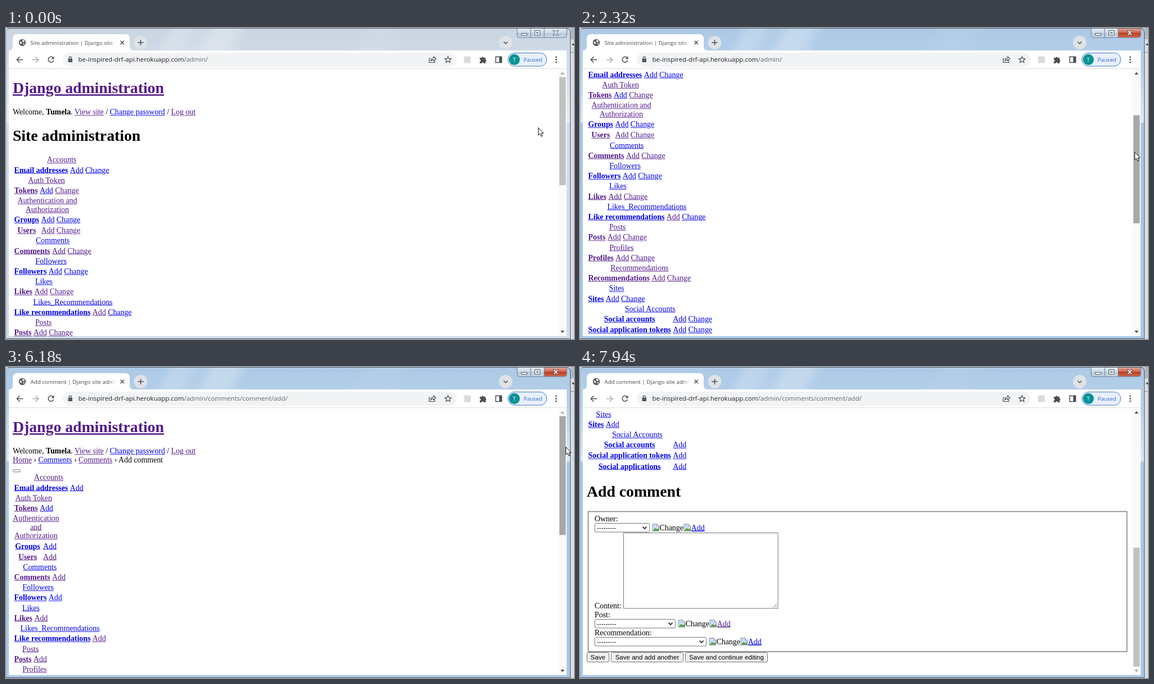
Recreate the animation shown at these times as an HTML page. Size 1010x554 px, loop 8000 ms.

```html
<!DOCTYPE html>
<html lang="en">
<head>
<meta charset="utf-8">
<title>Site administration</title>
<style>
html, body { margin: 0; width: 100%; height: 100%; overflow: hidden; }
#stage { position: relative; width: 1010px; height: 554px; overflow: hidden; background: #d9dde2; }
#stage > * { position: absolute; }
#frame {
  --streaks: linear-gradient(118deg, transparent 27%, #fff3 29% 31%, #fff1 33% 34%, #fff4 36% 39%, transparent 42% 60%, #fff1 63% 66%, transparent 70%) 0 0 / 100% 72px no-repeat;
  left: 0; top: 0; width: 1002px; height: 552px;
  border: 1px solid #4d5966; border-left-color: #a9bccf; border-radius: 7px 7px 0 0;
  background: var(--streaks), linear-gradient(#c9d5e2, #d3dde9 72px, #e6edf5 167px, #cfdcea 168px);
}
#frame.active {
  background: var(--streaks), linear-gradient(#acc9e6, #b7d1ea 72px, #dbe9f6 167px, #a7c7e7 168px);
}
#view { left: 5px; top: 73px; width: 992px; height: 476px; overflow: hidden; background: #fff; }
.page { position: absolute; left: 0; top: 0; }
.flow {
  position: absolute; display: flow-root; width: 1112px; padding: 0 8px;
  transform: scale(.867); transform-origin: 0 0;
  font: 16px/18px "Liberation Serif", "Times New Roman", serif; color: #000;
}
h1 { font-size: 32px; line-height: 37px; margin: 21.44px 0; }
a { color: #00e; text-decoration: underline; }
a.seen { color: #551a8b; }
a.hit { color: #f00; }
table { border-spacing: 2px; border-collapse: separate; }
th, td { padding: 1px; }
.toggle { height: 18px; position: relative; }
.toggle i {
  position: absolute; top: 10.5px; box-sizing: border-box; width: 16px; height: 6px;
  border: 1px solid #767676; border-radius: 2px; background: #efefef;
}
svg { left: 0; top: 0; overflow: visible; }
.form { position: absolute; left: -5px; top: 454px; }
.form text { font: 13.87px "Liberation Serif", "Times New Roman", serif; }
.form .ctl { font: 11.56px "Liberation Sans", Arial, sans-serif; }
.form .link { fill: #00e; text-decoration: underline; }
.form .link.seen { fill: #551a8b; }
#ui text { font-family: "Open Sans", "Noto Sans", sans-serif; }
.line { fill: none; stroke: #4b4f54; stroke-width: 1.5; }
</style>
</head>
<body>
<div id="stage">
  <div id="frame"></div>
  <div id="view">
    <div class="page" id="index"><div class="flow"></div></div>
    <div class="page" id="add">
      <div class="flow"></div>
      <svg class="form" width="1010" height="554"></svg>
    </div>
  </div>
  <svg id="ui" width="1010" height="554">
    <defs>
      <linearGradient id="fade"><stop offset="0" stop-color="#fff" stop-opacity="0"/><stop offset="1" stop-color="#fff"/></linearGradient>
      <linearGradient id="red" x2="0" y2="1"><stop offset="0" stop-color="#e2a598"/><stop offset=".45" stop-color="#cf6552"/><stop offset=".5" stop-color="#b93a22"/><stop offset="1" stop-color="#d3694c"/></linearGradient>
      <linearGradient id="glass" x2="0" y2="1"><stop offset="0" stop-color="#e3edf6"/><stop offset=".48" stop-color="#ccdbea"/><stop offset=".52" stop-color="#b5c9dd"/><stop offset="1" stop-color="#c9dbec"/></linearGradient>
    </defs>

    <!-- window behind -->
    <path d="M1004 0h6v20h-6z" fill="#aeb6c0"/>
    <path d="M1004 43.5h6" stroke="#8d949c"/>
    <path d="M1006 28h6l-3 3.5z" fill="#333"/>

    <!-- caption buttons -->
    <path d="M909 1h48v16h-44q-4 0-4-4z" fill="url(#glass)"/>
    <path id="close" d="M957 1h40v12q0 4-4 4h-36z"/>
    <path d="M909 1v12q0 4 4 4h80q4 0 4-4V1M933 1v16M957 1v16" fill="none" stroke="#6f7d8d"/>
    <g fill="#fff" stroke="#4c545e">
      <path d="M916.5 9.5h10v3.500h-10zM940.500 4.500h9v8.500h-9z"/>
      <path d="M943.500 7.500h3v2.500h-3z"/>
      <path d="M972.500 4.500h3l2 2.300 2-2.300h3l-3.500 4.200 3.500 4.300h-3l-2-2.400-2 2.400h-3l3.500-4.300z"/>
    </g>

    <!-- tab strip -->
    <path d="M5 40q7 0 7-7V19q0-8 8-8h192q8 0 8 8v14q0 7 7 7z" fill="#fff"/>
    <path d="M5 40h992v32H5z" fill="#fff"/>
    <path d="M5 72.500h992" stroke="#dcdfe3"/>
    <g id="globe">
      <circle cx="29" cy="26" r="6.200" fill="#54585d"/>
      <path d="M24.500 23.500l3 1 1 2.500-1.500 2-2-1.500zM29 21l3 .5 1.500 3-3 1-1.500-2zM30.500 27l3 .5-1.500 2.500-1.500-1z" fill="#fff" opacity=".85"/>
    </g>
    <path id="spin" d="M29 20.200a5.800 5.800 0 1 1-5.800 5.800" fill="none" stroke-width="1.700"/>
    <text id="title" x="43.500" y="29.700" font-size="9.750" fill="#45494d"></text>
    <path d="M182 16h14v20h-14z" fill="url(#fade)"/>
    <path d="M196 16h8v20h-8z" fill="#fff"/>
    <path class="line" d="M203.500 22.800l6.400 6.400m0-6.400l-6.400 6.400"/>
    <g fill="#dfe2e6"><circle cx="239.500" cy="26" r="12"/><circle cx="888.500" cy="26" r="12"/></g>
    <path class="line" d="M234.500 26h10m-5-5v10M885 24.500l3.500 3.500 3.500-3.500"/>

    <!-- toolbar -->
    <rect x="101" y="44" width="700" height="25" rx="12.500" fill="#f1f3f4"/>
    <path class="line" d="M30.500 56.500h-11m5-5.200l-5.200 5.200 5.200 5.200"/>
    <path class="line" d="M46.500 56.500h11m-5-5.200l5.200 5.200-5.200 5.200" style="stroke:#a9adb1"/>
    <g id="reload"><path class="line" d="M84.200 53.500a4.900 4.900 0 1 0 .5 4.200"/><path d="M85.500 50.500v5h-5z" fill="#4b4f54"/></g>
    <path id="stop" class="line" d="M75.500 52l9 9m0-9l-9 9"/>
    <path d="M110.500 54.500h7.500v6.500h-7.500z" fill="#55595e"/>
    <path class="line" d="M112.200 55v-1.800a2 2 0 0 1 4.100 0V55" style="stroke-width:1.200"/>
    <text x="128.500" y="60.300" font-size="11.520" fill="#202124">be-inspired-drf-api.herokuapp.com<tspan id="path" fill="#62666b"></tspan></text>
    <g class="line" style="stroke-width:1.200">
      <path d="M755 54.500h-2.500v7h10v-3M755.500 58.500c.3-3.500 2.500-5 5-5v-2.300l4 3.700-4 3.700v-2.300c-2 0-3.500.5-5 2.200z"/>
      <path d="M786 50.700l1.600 3.700 4 .4-3 2.700.9 3.900-3.500-2.100-3.500 2.100.9-3.900-3-2.700 4-.4z"/>
      <path d="M870.800 51.300h10.600v10.200h-10.600z" style="stroke-width:1.500"/>
    </g>
    <path d="M877 51h5v11h-5z" fill="#4b4f54"/>
    <rect x="814.500" y="50.500" width="12" height="12" fill="#d9dbde"/>
    <path d="M842.500 53h3.300a1.900 1.900 0 0 1 3.700 0h3.200v3.200a1.900 1.900 0 0 1 0 3.700V63h-3.200a1.700 1.700 0 0 0-3.600 0h-3.400v-3.300a1.700 1.700 0 0 0 0-3.500z" fill="#4b4f54"/>
    <rect x="892.500" y="44.500" width="69" height="23.500" rx="11.700" fill="#e8f0fe" stroke="#3b78c9"/>
    <circle cx="904" cy="56.300" r="9.700" fill="#0a9295"/>
    <text x="904" y="59.800" font-size="9.500" fill="#fff" text-anchor="middle">T</text>
    <text x="920.500" y="59.800" font-size="9.650" fill="#2a6bc8">Paused</text>
    <g fill="#4b4f54"><circle cx="978.300" cy="52" r="1.400"/><circle cx="978.300" cy="56.500" r="1.400"/><circle cx="978.300" cy="61" r="1.400"/></g>

    <!-- scrollbar -->
    <path d="M982 73h15v476h-15z" fill="#fafafa"/>
    <path id="up" d="M986 82.700l3.500-4 3.500 4z"/>
    <path id="down" d="M986 539.300l3.500 4 3.500-4z"/>
    <rect id="thumb" x="984" width="11.300"/>

    <g id="status">
      <path d="M5 530.500h325q5 0 5 5V549H5z" fill="#dee1e6"/>
      <text x="9.700" y="543.300" font-size="9.900" fill="#55595e">be-inspired-drf-api.herokuapp.com/admin/comments/comment/add/</text>
    </g>
    <path id="cursor" d="M.5.5V14l3-2.800 2.200 4.900 2.300-1-2.200-4.700h4.100z" fill="#fff" stroke="#111"/>
  </svg>
</div>
<script>
const $ = id => document.getElementById(id);
const link = (text, seen) => `<a class="${+seen ? 'seen' : ''}">${text}</a>`;

// caption, caption visited, then rows of [model, visited flags for model / add / change]
const APPS = [
  ['Accounts', 1, ['Email addresses', '000']],
  ['Auth Token', 1, ['Tokens', '101']],
  ['Authentication and Authorization', 1, ['Groups', '000'], ['Users', '111']],
  ['Comments', 0, ['Comments', '111']],
  ['Followers', 0, ['Followers', '000']],
  ['Likes', 0, ['Likes', '111']],
  ['Likes_Recommendations', 0, ['Like recommendations', '010']],
  ['Posts', 1, ['Posts', '111']],
  ['Profiles', 1, ['Profiles', '111']],
  ['Recommendations', 1, ['Recommendations', '111']],
  ['Sites', 0, ['Sites', '000']],
  ['Social Accounts', 0, ['Social accounts', '000'], ['Social application tokens', '000'], ['Social applications', '000']],
];

const tables = actions => APPS.map(([name, seen, ...rows]) =>
  `<table><caption>${link(name, seen)}</caption>` + rows.map(([model, flags]) =>
    `<tr><th>${link(model, flags[0])}</th>` +
    actions.map((label, i) => `<td>${link(label, flags[i + 1])}</td>`).join('') + '</tr>'
  ).join('') + '</table>').join('');

const header = `<h1>${link('Django administration', 1)}</h1><div>Welcome, <b>Tumela</b>. ` +
  `${link('View site', 1)} / ${link('Change password', 0)} / ${link('Log out', 1)}</div>`;

document.querySelector('#index .flow').innerHTML =
  header + '<h1>Site administration</h1>' + tables(['Add', 'Change']);
document.querySelector('#add .flow').innerHTML = header +
  `<div>${link('Home', 1)} › ${link('Comments', 0)} › ${link('Comments', 1)} › Add comment</div>` +
  '<div class="toggle"><i></i></div>' + tables(['Add']) + '<h1>Add comment</h1>';
const addLink = document.querySelectorAll('#index table')[3].querySelector('td a');

const label = (x, y, text, cls = '') => `<text x="${x}" y="${y}" class="${cls}">${text}</text>`;
const box = (x, y, w, h, fill, r = 2) =>
  `<rect x="${x}" y="${y}" width="${w}" height="${h}" rx="${r}" fill="${fill}" stroke="#767676"/>`;
const brokenImage = (x, y) => `<g transform="translate(${x} ${y})">
  <path d="M1 .5h8l3.500 3.500v9H1z" fill="#c9dcf5" stroke="#8d9196"/>
  <path d="M1.500 12.500l4-5 3 2 3.500-1v4z" fill="#58a345"/>
  <path d="M9 .5V4h3.500" fill="#fff" stroke="#8d9196"/></g>`;
const picker = (y, w, seen) => box(26.5, y, w, 15.5, '#fff') +
  label(30, y + 11.5, '---------', 'ctl') +
  `<path d="M${w + 14.5} ${y + 6}l3.500 3.500 3.500-3.500" fill="none" stroke="#111" stroke-width="1.600"/>` +
  brokenImage(w + 31, y + .8) + label(w + 44.5, y + 12, 'Change') +
  brokenImage(w + 87, y + .8) + label(w + 100.8, y + 12, 'Add', 'link ' + (seen ? 'seen' : ''));
const button = (x, w, text) => box(x, 508.5, w, 17, '#efefef') +
  `<text x="${x + w / 2}" y="521.200" text-anchor="middle" class="ctl">${text}</text>`;

document.querySelector('.form').innerHTML =
  '<rect x="14.500" y="257.500" width="958" height="249.500" fill="none" stroke="#8a8a8a" stroke-width="1.700"/>' +
  label(26, 275, 'Owner:') + picker(278.5, 97, 0) +
  label(26, 430, 'Content:') + box(77.5, 295.5, 274.5, 134.5, '#fff', 0) +
  '<path d="M344 428l6-6m-2.500 6l2.500-2.500" stroke="#777"/>' +
  label(26, 445.5, 'Post:') + picker(449.5, 143, 1) +
  label(26, 477.5, 'Recommendation:') + picker(481.5, 198, 0) +
  button(12.5, 39, 'Save') + button(55.5, 128, 'Save and add another') +
  button(187.5, 146, 'Save and continue editing');

// Each move: start, end, number of steps, then where it arrives.
const CURSOR = [
  [180, 260, 2, 986, 178], [430, 600, 3, 1000, 172], [660, 730, 2, 986, 157],
  [930, 1360, 6, 986, 214], [1450, 1750, 5, 986, 221], [2490, 2610, 3, 233, 191],
  [2860, 3160, 6, 60, 217], [3350, 3870, 9, 92, 229], [5230, 5400, 4, 572, 247],
  [5640, 5750, 3, 867, 165], [5940, 6180, 5, 995, 142], [6240, 6530, 5, 1013, 146],
];
const INDEX_SCROLL = [[930, 1360, 6, 139.7], [1450, 1750, 5, 169.8]];
const ADD_SCROLL = [[6770, 6950, 3, 212.8], [6995, 7040, 2, 290], [7380, 7610, 4, 527]];

const IDLE = '#c1c1c1', HOVER = '#a8a8a8', PRESSED = '#787878';
const THUMB = [
  [0, IDLE], [260, HOVER], [515, IDLE], [660, HOVER], [930, PRESSED], [2320, HOVER],
  [2490, IDLE], [6120, HOVER], [6450, PRESSED], [7940, IDLE],
];

const LOOP = 8000, CLICK = 4310, REQUEST = 4510, COMMIT = 4780, PAINT = 4960, LOADED = 5080;

function travel(t, from, moves) {
  let at = from;
  for (const [t0, t1, n, ...to] of moves) {
    if (t < t0) break;
    const p = Math.min(1, (Math.floor((t - t0) / (t1 - t0) * (n - 1) + 1e-6) + 1) / n);
    at = at.map((v, i) => v + (to[i] - v) * p);
  }
  return at;
}
const show = (id, on) => { $(id).style.display = on ? '' : 'none'; };
const set = (id, attrs) => { for (const k in attrs) $(id).setAttribute(k, attrs[k]); };

function draw(t) {
  const active = t >= 930, added = t >= PAINT, committed = t >= COMMIT;
  const loading = t >= REQUEST && t < LOADED;
  const [scroll] = added ? travel(t, [0], ADD_SCROLL) : travel(t, [0], INDEX_SCROLL);
  const [x, y] = travel(t, [946, 177], CURSOR);

  $('frame').className = active ? 'active' : '';
  set('close', { fill: active ? 'url(#red)' : 'url(#glass)' });

  show('index', !added);
  show('add', added);
  $(added ? 'add' : 'index').style.transform = `translateY(${-scroll}px)`;
  addLink.className = t >= CLICK && t < REQUEST ? 'hit' : 'seen';

  show('globe', !loading);
  show('spin', loading);
  show('reload', !loading);
  show('stop', loading);
  set('spin', {
    stroke: committed ? '#5b93e6' : '#9aa0a6',
    transform: `rotate(${(t - 4860) * (committed ? .36 : -.25)} 29 26)`,
  });
  $('title').textContent = committed ? 'Add comment | Django site admi' : 'Site administration | Django site a';
  $('path').textContent = committed ? '/admin/comments/comment/add/' : '/admin/';
  show('status', t >= 3590 && t < LOADED);

  set('thumb', {
    y: 87.5 + scroll * (added ? .4445 : .4),
    height: added ? 211.8 : 192.5,
    fill: THUMB.findLast(([from]) => t >= from)[1],
  });
  set('up', { fill: scroll > 0 ? '#444' : '#a3a3a3' });
  set('down', { fill: added && scroll > 526 ? '#a3a3a3' : '#444' });
  set('cursor', { transform: `translate(${x} ${y})` });
}

const start = performance.now();
function tick(now) {
  draw(Math.max(0, now - start) % LOOP);
  requestAnimationFrame(tick);
}
draw(0);
requestAnimationFrame(tick);
</script>
</body>
</html>
```
